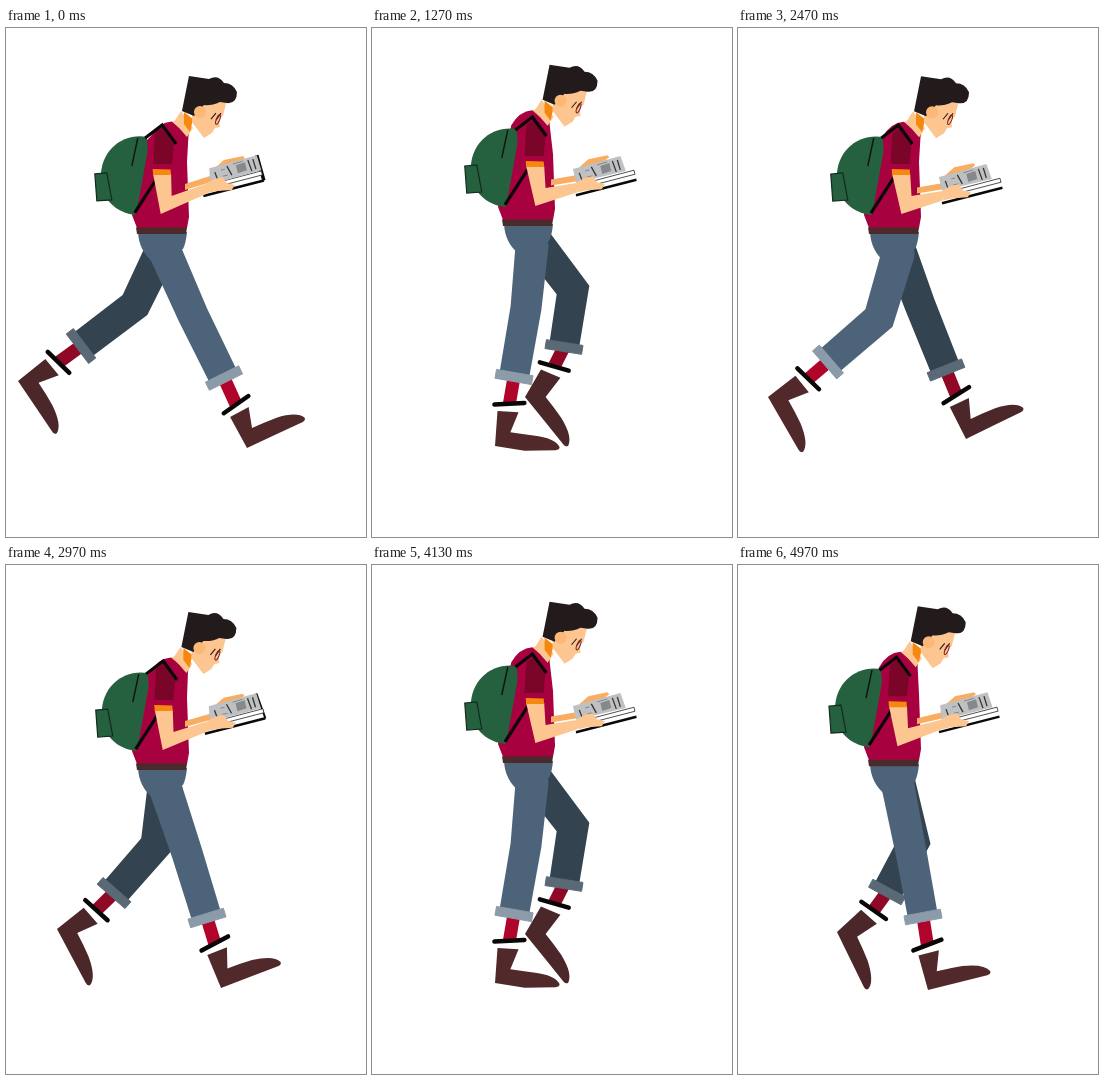
An HTML page that plays this animation: 360x509 px, repeating every 5 s.

```html
<!DOCTYPE html>
<html lang="en">
<head>
<meta charset="utf-8">
<title>Walking reader</title>
<style>
  html, body { margin: 0; width: 100%; height: 100%; overflow: hidden; background: #fff; }
  svg { display: block; width: 100vw; height: 100vh; }
</style>
</head>
<body>
<svg viewBox="0 0 360 509">
  <g id="farLeg"></g>
  <g id="nearLeg"></g>
  <g id="upper">
    <path id="neck" fill="#fdc690"/>
    <path id="torso" fill="#a7013f"/>
    <path fill="#4b2a2c" d="M130 195.500H181L180 202H131Z"/>
    <g id="bag">
      <path fill="#25603f" d="M143 105C118 101 97 119 97 145C97 167 112 181 132 183Q137 158 144 118Z"/>
      <path fill="none" stroke="#111" stroke-width="1.4" d="M134 106L128 134"/>
      <path fill="#25603f" stroke="#15291e" stroke-width="1.2" d="M91 142L103 141L108 168L93 169Z"/>
    </g>
    <path id="shade" fill="#7b0429" d="M152 101L160 95L171 112L169 132L150 132Z"/>
    <path id="strap" fill="none" stroke="#0b0809" stroke-width="3.2" d="M141.5 106L158.5 93L172.5 112M131 181L153.5 146"/>
    <path id="farArm" fill="#f9ad62"/>
    <path id="farHand" fill="#f9ad62" d="M208 140L217 132L236 128L238 130L231 135L222 141Z"/>
    <g id="book">
      <path id="spine" stroke="#0b0809"/>
      <path id="pages" fill="#fff" stroke="#222" stroke-width=".8"/>
      <path id="cover" stroke="#0b0809" stroke-width="2.5"/>
      <path id="sheet" fill="#bfc0c1"/>
      <g id="print">
        <path fill="#86898c" d="M229 138L238 135L240 143L231 146Z"/>
        <path fill="none" stroke="#333" stroke-width="1.3" d="M208 145L212 156M220 139L225 148M241 133L245 144M246 132L249 142"/>
        <path fill="none" stroke="#777" stroke-width=".8" d="M214 143L218 142M216 149L221 148M226 137L236 134"/>
      </g>
    </g>
    <path id="arm" fill="#fdc690"/>
    <path id="hand" fill="#fdc690" d="M200 157L210 151L219 149L223 155L231 157L228 162L213 163L204 165Z"/>
    <path id="sleeve" fill="#f6870f" d="M150.5 137L168.5 137.5L169 143L151 143Z"/>
  </g>
  <g id="head">
    <path fill="#fdc690" d="M175 83L168 94L181 109L187 100Z"/>
    <path fill="#f6870f" d="M178 84L187 91L184 104L178 96Z"/>
    <path fill="#fdc690" d="M186 84L197 74L221 72L217 88L213 91L214 99L209 100L206 105L198 110L186 94Z"/>
    <path fill="#231a1b" d="M176 83L183 48L203 51Q212 46 218 55Q227 55 231 64Q231 76 221 75L214 74Q205 78 198 77L188 88Z"/>
    <circle cx="194" cy="84" r="6" fill="#fbb877"/>
    <g fill="none" stroke-width="1.1">
      <path stroke="#2b1717" d="M205 91L210 85M210 92L215 85"/>
      <ellipse stroke="#7d2524" cx="212" cy="91.500" rx="1.600" ry="5" transform="rotate(22 212 91.500)"/>
    </g>
  </g>
</svg>
<script>
const LOOP = 5000, CYCLE = 24;

// time, knee x y, cuff x y, heel x y, foot angle, ankle band angle
const keys = [
  [0, 187, 287, 218, 350, 241, 420, -25, -35],
  [1, 184, 288, 210, 353, 230, 422, -26, -32],
  [2, 181, 288, 201, 353, 215, 423, -21, -28],
  [4, 173, 287, 185, 352, 190, 425, -14, -21],
  [6, 157, 286, 156, 349, 149, 420, 0, -8],
  [7, 154, 280, 142, 349, 123, 418, 9, -3],
  [9, 143, 289, 110, 344, 67, 402, 32, 17],
  [12, 131, 288, 77, 329, 14, 364, 56, 44],
  [13, 141, 290, 90, 334, 30, 369, 60, 44],
  [14, 152, 291, 110, 339, 53, 375, 62, 42],
  [16, 178, 288, 151, 338, 101, 378, 64, 35],
  [18, 203, 273, 185, 331, 137, 372, 67, 28],
  [19, 203, 273, 194, 330, 155, 380, 51, 16],
  [21, 199, 281, 207, 340, 202, 406, 9, -12]
];

const nearColors = { pants: '#4c6379', cuff: '#8c9baa', sock: '#b0042a', shoe: '#52292b' };
const farColors = { pants: '#33434f', cuff: '#596a76', sock: '#8f0826', shoe: '#4b2729' };

const el = id => document.getElementById(id);
const poly = pts => 'M' + pts.map(p => p.map(v => v.toFixed(2)).join(' ')).join('L') + 'Z';
const rad = deg => deg * Math.PI / 180;
const add = (p, q, k = 1) => [p[0] + q[0] * k, p[1] + q[1] * k];
const setPath = (id, d) => el(id).setAttribute('d', d);
const move = (id, x, y) => el(id).setAttribute('transform', `translate(${x} ${y})`);

function turn([x, y], deg, [cx, cy] = [0, 0]) {
  const c = Math.cos(rad(deg)), s = Math.sin(rad(deg));
  return [cx + (x - cx) * c - (y - cy) * s, cy + (x - cx) * s + (y - cy) * c];
}

function unit(from, to) {
  const x = to[0] - from[0], y = to[1] - from[1], d = Math.hypot(x, y);
  return [x / d, y / d];
}

function keyAt(i) {
  const lap = Math.floor(i / keys.length), [t, ...rest] = keys[i - lap * keys.length];
  return [t + lap * CYCLE, ...rest];
}

// Cubic Hermite through the cyclic keys
function pose(n) {
  let i = keys.length - 1;
  while (keys[i][0] > n) i--;
  const [a, b, c, d] = [-1, 0, 1, 2].map(k => keyAt(i + k));
  const span = c[0] - b[0], u = (n - b[0]) / span;
  return b.slice(1).map((v, k) => {
    const j = k + 1;
    const m0 = (c[j] - a[j]) / (c[0] - a[0]) * span;
    const m1 = (d[j] - b[j]) / (d[0] - b[0]) * span;
    const u2 = u * u, u3 = u2 * u;
    return v * (2 * u3 - 3 * u2 + 1) + m0 * (u3 - 2 * u2 + u) + c[j] * (3 * u2 - 2 * u3) + m1 * (u3 - u2);
  });
}

function shoePath(heel, angle, bend, flex) {
  const ball = [30, 0], pivot = [6, -12];
  const place = p => add(heel, turn(p, angle)).map(v => v.toFixed(2)).join(' ');
  const ankle = p => place(turn(p, flex, pivot));
  const toe = p => place(turn(p, bend, ball));
  return `M${place([0, 0])}L${ankle([-3, -35])}L${ankle([18, -37])}L${place([13, -16])}` +
    `Q${place([26, -16])} ${toe([39, -15])}Q${toe([61, -12])} ${toe([65, -3])}` +
    `Q${toe([65, 0])} ${toe([61, 0])}L${place(ball)}Z`;
}

function legMarkup(n, hip, offset, colors, pelvis) {
  const [kx, ky, cx, cy, hx, hy, angle, band] = pose(n);
  const knee = add([kx, ky], offset), cuff = add([cx, cy], offset), heel = add([hx, hy], offset);
  const bend = -30 * Math.max(0, 1 - Math.abs(n - 9) / 3);
  const flex = band - angle + 12;

  const thigh = unit(hip, knee), shin = unit(knee, cuff);
  const n1 = [thigh[1], -thigh[0]], n2 = [shin[1], -shin[0]];
  const miter = add(n1, n2), scale = 2 / (miter[0] ** 2 + miter[1] ** 2);
  const pants = poly([
    add(hip, n1, 16.5), add(knee, miter, 15.5 * scale), add(cuff, n2, 15),
    add(cuff, n2, -15), add(knee, miter, -15.5 * scale), add(hip, n1, -16.5)
  ]);
  const corner = (side, along) => add(add(cuff, n2, side), shin, along);
  const cuffPath = poly([corner(18.5, -4.5), corner(18.5, 4.5), corner(-18.5, 4.5), corner(-18.5, -4.5)]);

  const ankle = add(heel, turn(turn([7.5, -36], flex, [6, -12]), angle));
  const strap = add(ankle, unit(ankle, cuff), 8);
  const half = turn([15, 0], band), from = add(strap, half, -1), to = add(strap, half);
  return `<path d="${shoePath(heel, angle, bend, flex)}" fill="${colors.shoe}"/>
    <path d="M${cuff}L${strap}" stroke="${colors.sock}" stroke-width="13"/>
    <path d="M${from}L${to}" stroke="#080607" stroke-width="4.5" stroke-linecap="round"/>
    <circle cx="${hip[0]}" cy="${hip[1]}" r="16.5" fill="${colors.pants}"/>
    <path d="${pants}${pelvis}" fill="${colors.pants}"/>
    <path d="${cuffPath}" fill="${colors.cuff}" stroke="${colors.cuff}" stroke-linejoin="round"/>`;
}

function render(n) {
  const bob = Math.cos(2 * Math.PI * (n - 0.6) / 12);
  const sway = Math.cos(2 * Math.PI * (n - 10) / CYCLE);
  const drop = 4.1 * bob, belt = 195 + drop;

  const pelvis = `M132 ${belt + 5}H181Q180 ${belt + 16} 177 ${belt + 22}L147 ${belt + 35}Q133 ${belt + 24} 132 ${belt + 5}Z`;
  el('farLeg').innerHTML = legMarkup((n + 12) % CYCLE, [159, belt + 16], [-2, -11], farColors, '');
  el('nearLeg').innerHTML = legMarkup(n, [160, belt + 27], [0, 0], nearColors, pelvis);

  move('upper', 0, drop);
  move('head', 2.8 * bob - 2.7, 5.9 * bob - 5.5);
  move('bag', 2.5 * sway, 0);
  move('strap', 2.7 * sway, 0);
  move('shade', 3.5 * sway, 0);
  move('sleeve', 4.5 * sway, 0);

  const top = (x, y) => `${x + 2.8 * bob} ${y + 1.8 * bob}`;
  setPath('torso', `M126 183L131 150L137 112L${top(142, 103)}Q${top(150, 89)} ${top(163, 88)}` +
    `L${top(170, 94)}L${top(180, 99)}L181 130L183 185L181 196H131Z`);
  setPath('neck', `M${top(160, 90)}L${top(168, 86)}L${top(181, 101)}L${top(178, 106)}Z`);

  const lift = 4.5 * sway;
  setPath('arm', poly([
    [151 + 4.5 * sway, 142], [169 + 4.5 * sway, 142], [170 + 5 * sway, 164],
    [201 + 2 * sway, 156 + lift], [204 + 2 * sway, 165 + lift], [159.5 + 5.5 * sway, 182]
  ]));
  move('hand', 2.5 * sway, lift);
  setPath('farArm', poly([[179, 154 + lift / 2], [204, 148 + lift], [205, 154 + lift], [179, 160 + lift / 2]]));
  move('farHand', -sway, lift);

  const sheetLift = 5.5 * sway, coverX = 4.2 * sway, coverY = 4.6 * sway;
  const topRight = [249.5 - 1.5 * sway, 128 + sheetLift];
  const bottomRight = [254.5 - sway, 143 + sheetLift];
  const coverEnd = [261.5 + coverX, 152.5 + coverY];
  setPath('sheet', poly([[202 - 1.5 * sway, 141 + sheetLift], topRight, bottomRight, [204, 156 + 4 * sway]]));
  setPath('pages', poly([
    [202 + coverX, 158 + coverY], [259 + coverX, 143 + coverY],
    [260 + coverX, 147 + coverY], [202 + coverX, 162 + coverY]
  ]));
  setPath('cover', `M${201 + coverX} ${168 + coverY}L${coverEnd}`);
  setPath('spine', `M${topRight}L${coverEnd}`);
  el('spine').setAttribute('stroke-width', Math.max(0, -4 * sway));
  move('print', -sway, sheetLift);
}

// The walk is posed 25 times a second and shown 30 times a second
function poseIndex(time) {
  const shown = Math.floor((time % LOOP) * 0.03 + 0.15) % 150;
  return Math.floor(shown * 5 / 6) % CYCLE;
}

const start = performance.now();
function tick() {
  render(poseIndex(performance.now() - start));
  requestAnimationFrame(tick);
}
tick();
</script>
</body>
</html>
```
